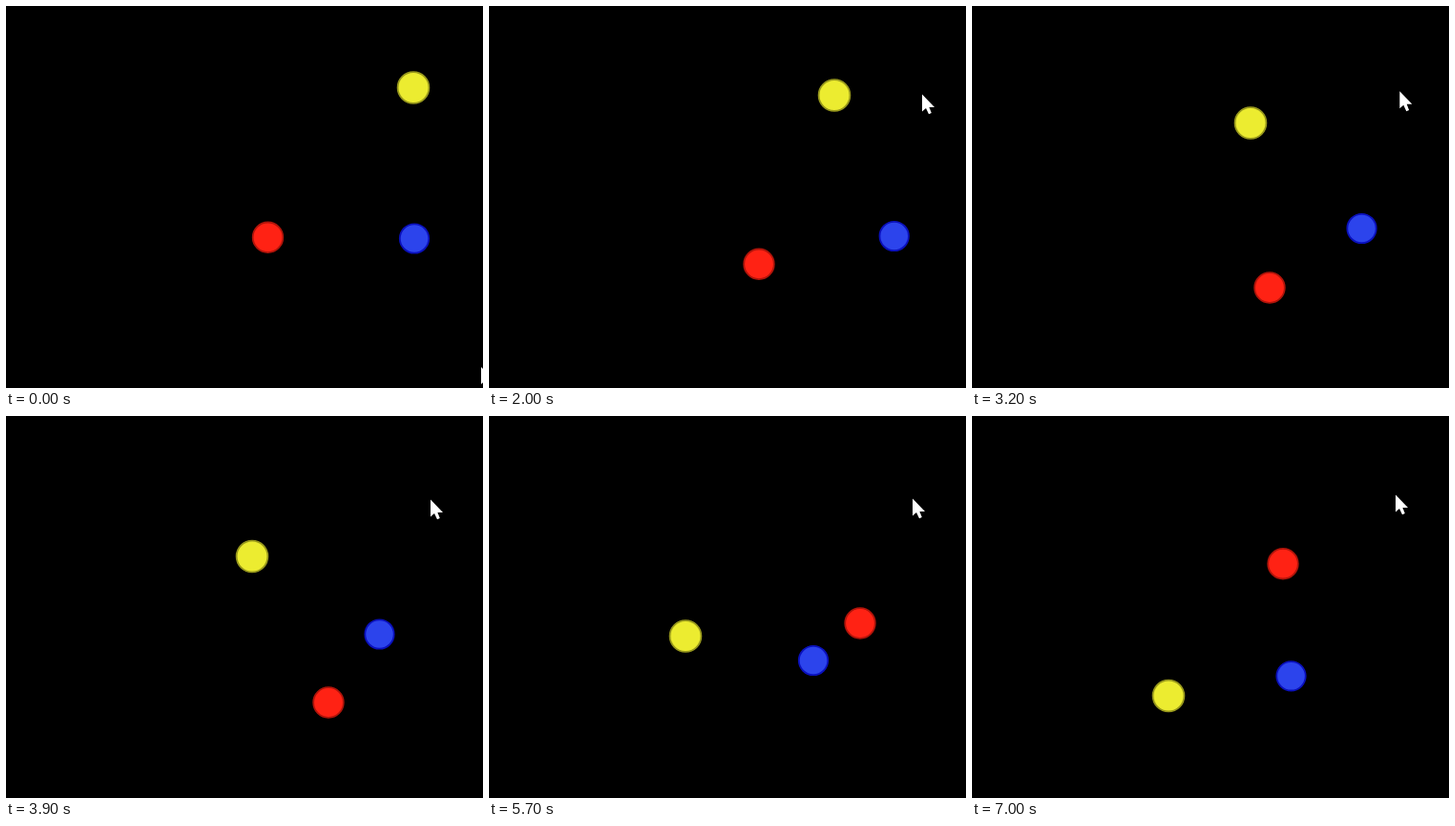
An HTML page for the animation above (7.1 s loop, 500x400 px).

```html
<!DOCTYPE html>
<html lang="en">
<head>
<meta charset="utf-8">
<title>Three bodies</title>
<style>
  html, body { margin: 0; width: 100%; height: 100%; overflow: hidden; background: #000; }
  svg { display: block; width: 500px; height: 400px; }
  circle { stroke-width: 1.8; }
</style>
</head>
<body>
<svg viewBox="0 0 500 400">
  <circle id="yellow" r="16.4" fill="#ecec30" stroke="#98981c"/>
  <circle id="red" r="15.8" fill="#ff2214" stroke="#b0140a"/>
  <circle id="blue" r="15.2" fill="#2c44ec" stroke="#0a10bc"/>
  <path id="pointer" fill="#fff" d="M0 0V18L4 14.4L7 20.8L9.8 19.6L7.4 13.4H13Z"/>
</svg>
<script>
const LOOP = 7100, STEP = 100;

// Seconds at which each path passes its points; the bodies rest until the first
const times = [1.1, 2, 3.2, 3.9, 4.8, 5.7, 7];
const paths = {
  yellow: [[427, 85.5], [362, 93.5], [292, 122.5], [258, 147], [225, 186.5], [206, 230.5], [206, 293]],
  red: [[274.5, 242.3], [283, 270.3], [312, 295], [338, 300], [381, 282], [389, 217], [326, 154.7]],
  blue: [[428, 243.5], [424.7, 241], [408.5, 233], [391.5, 228.5], [360, 232], [340, 256], [334.5, 272.3]]
};

// The pointer leaves at the right and comes back from the top: time, x, y
const pointer = [[0, 498, 378], [0.2, 502, 382], [1.1, 502, -24], [1.6, 457, 88],
  [2, 454, 92.5], [3.9, 445, 87.5], [5.7, 444, 86.5], [7, 444, 82.5]];

const segment = (knots, t) => {
  let i = 0;
  while (i < knots.length - 2 && t > knots[i + 1]) i++;
  return i;
};

// Natural cubic spline; the slopes are found by relaxation
function spline(ts, ys) {
  const last = ts.length - 1;
  const h = ts.slice(1).map((t, i) => t - ts[i]);
  const d = h.map((w, i) => (ys[i + 1] - ys[i]) / w);
  const v = ts.map(() => 0);
  for (let pass = 0; pass < 40; pass++) {
    v[0] = (3 * d[0] - v[1]) / 2;
    for (let i = 1; i < last; i++) {
      const a = h[i - 1], b = h[i];
      v[i] = (b * (3 * d[i - 1] - v[i - 1]) + a * (3 * d[i] - v[i + 1])) / (2 * (a + b));
    }
    v[last] = (3 * d[last - 1] - v[last - 1]) / 2;
  }
  return t => {
    t = Math.max(t, ts[0]);
    const i = segment(ts, t), u = (t - ts[i]) / h[i], w = 1 - u;
    return ys[i] * w * w * (1 + 2 * u) + ys[i + 1] * u * u * (3 - 2 * u)
      + h[i] * u * w * (v[i] * w - v[i + 1] * u);
  };
}

const bodies = Object.entries(paths).map(([id, points]) =>
  [id, ...[0, 1].map(k => spline(times, points.map(p => p[k])))]);

const pointerTimes = pointer.map(p => p[0]);

function pointerAt(t) {
  const i = segment(pointerTimes, t), a = pointer[i], b = pointer[i + 1];
  const u = (t - a[0]) / (b[0] - a[0]);
  return [1, 2].map(k => a[k] + (b[k] - a[k]) * u);
}

const place = (id, x, y) =>
  document.getElementById(id).setAttribute('transform', `translate(${x} ${y})`);

function draw(ms) {
  const t = Math.floor((ms % LOOP) / STEP) * STEP / 1000;
  for (const [id, x, y] of bodies) place(id, x(t), y(t));
  place('pointer', ...pointerAt(t));
}

let start;
function tick(now) {
  start ??= now;
  draw(Math.max(0, now - start));
  requestAnimationFrame(tick);
}
draw(0);
requestAnimationFrame(tick);
</script>
</body>
</html>
```
